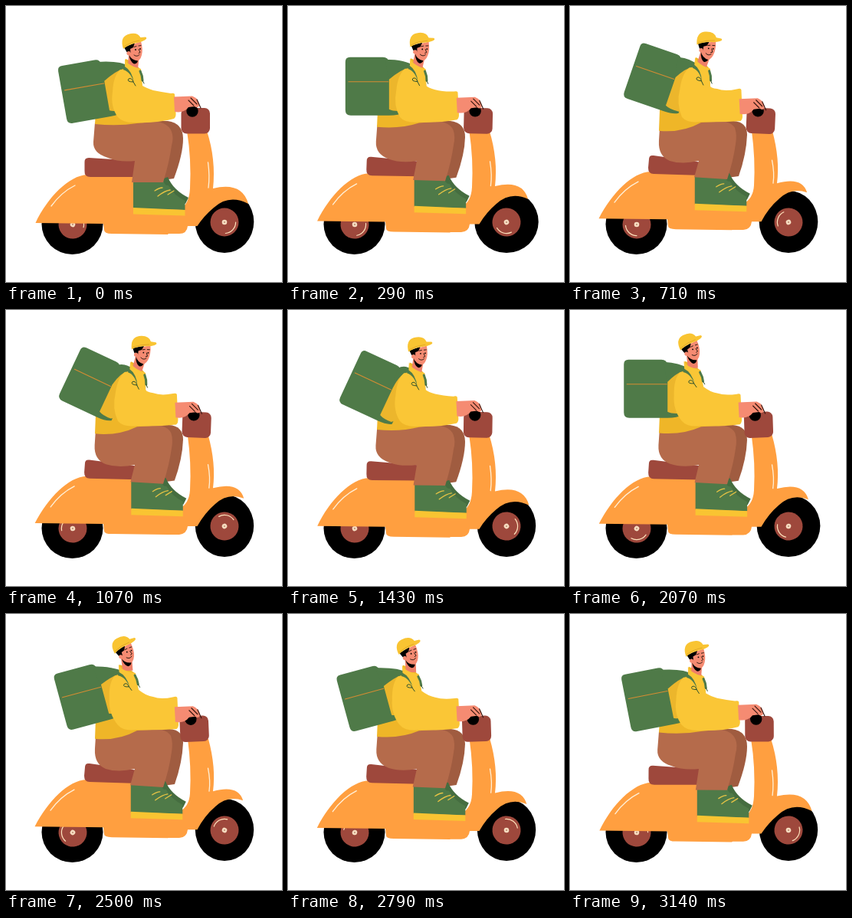
Animation, 360 px wide and 360 px high, one loop 3.21 s. Source, as an HTML page:

```html
<!DOCTYPE html>
<html lang="en">
<head>
<meta charset="utf-8">
<title>Courier on a scooter</title>
<style>
  html, body { margin: 0; width: 100%; height: 100%; overflow: hidden; background: #fff; }
  svg { display: block; width: 100vw; height: 100vh; }
  .line { fill: none; stroke-linecap: round; stroke-linejoin: round; }
</style>
</head>
<body>
<svg viewBox="0 0 360 360">
  <defs>
    <g id="hub">
      <circle r="18.5" fill="#9e483c"/>
      <path class="line" d="M14.6 0A14.6 14.6 0 0 1 1.3 14.5" stroke="#ffe3bd" stroke-width="1.2"/>
      <circle r="3.3" fill="#f6dcc0"/>
      <circle r="1" fill="#b88a70"/>
    </g>
  </defs>

  <ellipse cx="86.5" cy="284.5" rx="40" ry="39.5"/>
  <g id="rearHub"><use href="#hub"/></g>
  <ellipse id="frontTyre" cx="285" cy="281.5" ry="40.5"/>
  <g id="frontHub"><use href="#hub"/></g>

  <path id="body" fill="#ff9f40"/>
  <path id="shine" class="line" stroke="#fff0d8" stroke-width="1.3"/>
  <path id="seat" fill="#9e483c"/>

  <path id="backLeg" fill="#a05c40"/>
  <g id="shoe">
    <path d="M203 226L211 223Q218 240 238 250L234 258L206 246Z" fill="#456d40"/>
    <path d="M166 227H205Q207 235 212 234Q219 247 233.500 254V266L166 264Z" fill="#4f7a48"/>
    <path d="M166 263L233.500 266V273.500L166 271.500Z" fill="#f9c432"/>
    <path class="line" d="M194 241Q200 237 204 237M198 248Q207 241 214 240M211 246L219 241" stroke="#e8c445" stroke-width="1.3"/>
  </g>
  <path id="frontLeg" fill="#b56b4b"/>

  <path id="jacket" fill="#efb628"/>
  <g id="head">
    <path d="M160 62L174 64L172 82L159 80Z" fill="#ee7f68"/>
    <path d="M158 53L176 46Q179 57 177 64Q175 72 169 72.500Q162 71 159 62Z" fill="#f58b72"/>
    <path d="M154 54L168 48L166 54L162 56L162.500 61L157.500 60Z"/>
    <path d="M160.500 64Q164 71 172 71.500Q171 75.500 167 75.500Q162 73 160.500 64Z"/>
    <circle cx="160" cy="61.500" r="2.600" fill="#f58b72"/>
    <circle cx="169" cy="57" r=".9"/>
    <circle cx="175" cy="56" r=".9"/>
    <path class="line" d="M167 53.500L170 52.500M173 52L176 51.500M173 56.500L175 60.500L173 61.500M167 64Q171 67 174 63.500" stroke="#241710" stroke-width=".9"/>
    <path d="M153 56Q148 41 159 37Q171 33 175.500 41L182 40.500Q185 42 181 44.500Q177 47 171 48Q160 50 153 56Z" fill="#f9c432"/>
    <path class="line" d="M154 53Q163 47 174 45" stroke="#dda227" stroke-width=".8"/>
  </g>

  <g id="pack">
    <path d="M6 0H49Q56 0 57 7L76 12V72Q70 76 57 76H7Q0 76 0 69V6Q0 0 6 0Z" fill="#4f7a48"/>
    <path class="line" d="M4 32H57" stroke="#d58c32" stroke-width="1.1"/>
  </g>
  <path id="strap" fill="#4f7a48"/>
  <path id="shade" fill="#ecb62c"/>
  <path id="arm" fill="#fac636"/>
  <path id="sideStrap" class="line" stroke="#4f7a48" stroke-width="3"/>
  <path id="buckle" class="line" stroke="#2f512c" stroke-width="1"/>

  <g id="bars">
    <rect x="228.500" y="133" width="37.500" height="33.500" rx="7" fill="#9e483c"/>
    <circle cx="243" cy="137" r="7.700"/>
  </g>
  <g id="hand">
    <path d="M219 118.500L243 117.500Q252 121 252 130Q250 134 246 131L238 132Q232 140 220 138Z" fill="#f58b72"/>
    <path class="line" d="M238 123L245 130M241 120L249 128M249 122L254 133" stroke="#33150f" stroke-width="1.100"/>
  </g>
</svg>
<script>
const LOOP = 3210, STEPS = 45, STEP = LOOP / STEPS;
const TAU = Math.PI * 2, RAD = Math.PI / 180;
const el = id => document.getElementById(id);
const set = (id, name, value) => el(id).setAttribute(name, value);
const draw = (id, d) => set(id, "d", d);
const move = (id, value) => set(id, "transform", value);

// Blends two paths that share the same commands.
function mix(a, b, k) {
  const to = b.match(/-?[\d.]+/g);
  let i = 0;
  return a.replace(/-?[\d.]+/g, n => (+n + (to[i++] - n) * k).toFixed(2));
}

function turn(x, y, deg, cx = 0, cy = 0) {
  const c = Math.cos(deg * RAD), s = Math.sin(deg * RAD);
  return [cx + (x - cx) * c - (y - cy) * s, cy + (x - cx) * s + (y - cy) * c];
}

// Smooth periodic curve through [step, value] keys.
function curve(keys, at) {
  const n = keys.length;
  const key = i => {
    const w = Math.floor(i / n), [x, y] = keys[i - w * n];
    return [x + w * STEPS, y];
  };
  let i = 0;
  while (key(i + 1)[0] <= at) i++;
  const [a, b, c, d] = [-1, 0, 1, 2].map(o => key(i + o));
  const span = c[0] - b[0], u = (at - b[0]) / span;
  const m0 = (c[1] - a[1]) / (c[0] - a[0]) * span;
  const m1 = (d[1] - b[1]) / (d[0] - b[0]) * span;
  return (2*u**3 - 3*u**2 + 1) * b[1] + (u**3 - 2*u**2 + u) * m0
       + (3*u**2 - 2*u**3) * c[1] + (u**3 - u**2) * m1;
}

const packTurn = [[0, -10], [4, 0], [10, 19], [20, 25], [29, 0], [35, -15.2]];
const packDrop = [[0, 0], [4, 1.5], [10, 3], [20, 9.5], [29, -1], [35, -5]];

// Each pair holds the low and the raised pose.
const poses = {
  body: [
    "M38.5 283C54 250 82 221 106 220L166 221L168 264L228 264Q239 258 240 238Q242 200 236 163L262 163Q274 200 270 238Q308 229 316 258Q291 245 271 263Q258 274 249.500 287L237 287Q236 297 226 297L212 297L211 298L138 297Q128 297 128 292L127 284Z",
    "M37.5 277C55 244 81 217 105 216L166 217L166 258L226 258Q239 251 240 234Q242 200 237 163L264 163Q274 200 270 231Q303 222 309 243Q289 236 273 251Q259 263 249.500 281L237 281Q236 291 226 292L212 292L211 292L138 291Q128 291 128 287L127 278Z"],
  shine: [
    "M59 261Q72 243 90 234M263.5 204Q266 222 264 237",
    "M58 256Q71 238 89 229M263.5 201Q267 218 265 231"],
  seat: [
    "M108 198L172 202L172 223L110 223Q102 223 102.5 215L102.5 204Q102 198 108 198Z",
    "M109 195L172 204L172 221L109 219Q102 219 102 211L103 200Q103 194 109 195Z"],
  backLeg: [
    "M190 150L211 150Q231 153 231 173Q231 193 219 225L198 228Z",
    "M190 150L213 150Q231 151 231 168Q230 194 220 222L198 225Z"],
  frontLeg: [
    "M116 152L172 150Q210 147 216 164Q219 172 216 182Q213 204 205 230L164 230L168 202Q148 204 133 198Q113 192 114 177Z",
    "M117 160L170 149Q208 146 215 159Q218 168 216 180Q213 202 205 226L162 223L168 202Q146 207 130 202Q115 196 116 176Z"]
};

function render(step) {
  const phase = step / STEPS * TAU;
  const sway = Math.sin(phase);
  const lift = (.5 - .5 * Math.cos(2 * phase)) ** .7;
  const lean = 5.4 * sway;
  const leaned = (x, y) => turn(x, y - 3 * lift, lean, 150, 155);
  const torso = (x, y) => leaned(x, y).map(v => v.toFixed(2)).join(" ");

  for (const id in poses) draw(id, mix(...poses[id], lift));
  move("shoe", `translate(${-3.3 * lift} ${-5.3 * lift})`);

  const bulge = Math.max(0, Math.cos(2 * phase - 80 * RAD)) ** 2;
  set("frontTyre", "rx", 38.2 + 3.8 * bulge);
  const spin = step / STEPS * 720;
  move("frontHub", `translate(285 282) rotate(${spin})`);
  move("rearHub", `translate(87 285) rotate(${spin - 70})`);

  // Torso and head
  const hem = 154 + 9 * lift;
  draw("jacket", `M${torso(156, 69)}Q${torso(165, 72)} ${torso(175, 82)}L${torso(178, 106)}
    L190 151L171 ${153 - lift}Q146 ${hem + 3} 116 ${hem}L117 136L${torso(134, 92)}L${torso(154, 82)}Z`);
  const [nx, ny] = leaned(165, 75);
  move("head", `translate(${nx} ${ny - 2.5 * lift + .5 * sway}) rotate(${11 * sway + 3 * lift * (sway > 0)}) translate(-165 -75)`);

  // Backpack, held by a point behind the shoulder
  const tilt = curve(packTurn, step);
  const [hx, hy] = leaned(139, 107);
  const [ox, oy] = turn(66, 40, tilt);
  const px = hx - 1.2 * sway - ox, py = hy + curve(packDrop, step) - oy;
  const pack = (x, y) => {
    const [dx, dy] = turn(x, y, tilt);
    return `${(px + dx).toFixed(2)} ${(py + dy).toFixed(2)}`;
  };
  move("pack", `translate(${px} ${py}) rotate(${tilt})`);
  draw("strap", `M${pack(52, 3)}Q${torso(150, 71)} ${torso(160, 79)}Q${torso(167, 88)} ${torso(168, 101)}
    L${torso(156, 96)}L${torso(140, 100)}L${pack(57, 36)}Z`);
  draw("shade", `M${pack(57, 29)}Q${torso(144, 84)} ${torso(153, 82)}L${torso(156, 100)}
    L152 140L${pack(74, 70)}Q${pack(63, 71)} ${pack(57, 68)}Z`);

  // Sleeve stretches between the leaning shoulder and the bars
  const ex = 221 + 3.5 * lift, et = 114 - 6 * lift, eb = 147 + 3 * lift;
  draw("arm", `M${torso(149, 83)}Q${torso(140, 91)} ${torso(139, 112)}Q${torso(136, 132)} 146 145
    Q153 153 170 ${152 - lift}Q198 ${153 - lift} ${ex - 2} ${eb}Q${ex + 1} ${eb - 2} ${ex + .5} ${eb - 8}
    L${ex - 1} ${et + 1}Q${ex - 2} ${et - 1} ${ex - 6} ${et}Q202 112 192 ${110 - 2 * lift}
    Q183 107 ${torso(178, 104)}L${torso(176, 82)}Q${torso(166, 80)} ${torso(158, 74)}
    L${torso(155, 69)}L${torso(155, 79)}Q${torso(164, 84)} ${torso(167, 100)}Q${torso(161, 82)} ${torso(149, 83)}Z`);
  draw("sideStrap", `M${torso(175, 85)}Q${torso(178, 91)} ${torso(178, 97)}`);
  draw("buckle", `M${torso(166, 99)}Q${torso(157, 99)} ${torso(160, 95)}Q${torso(164, 93)} ${torso(166, 99)}L${torso(169, 104)}
    M${torso(178, 97)}L${torso(180, 101)}`);

  move("bars", `translate(${1.6 * sway} 0) rotate(${2.5 * sway} 247 150)`);
  move("hand", `translate(${1.3 * lift + .4 * sway} ${2.8 * lift})`);
}

function frame(now) {
  const time = Math.floor(now % LOOP / 10) * 10;
  render(Math.floor((time + 4.9) / STEP) % STEPS);
  requestAnimationFrame(frame);
}
render(0);
requestAnimationFrame(frame);
</script>
</body>
</html>
```
